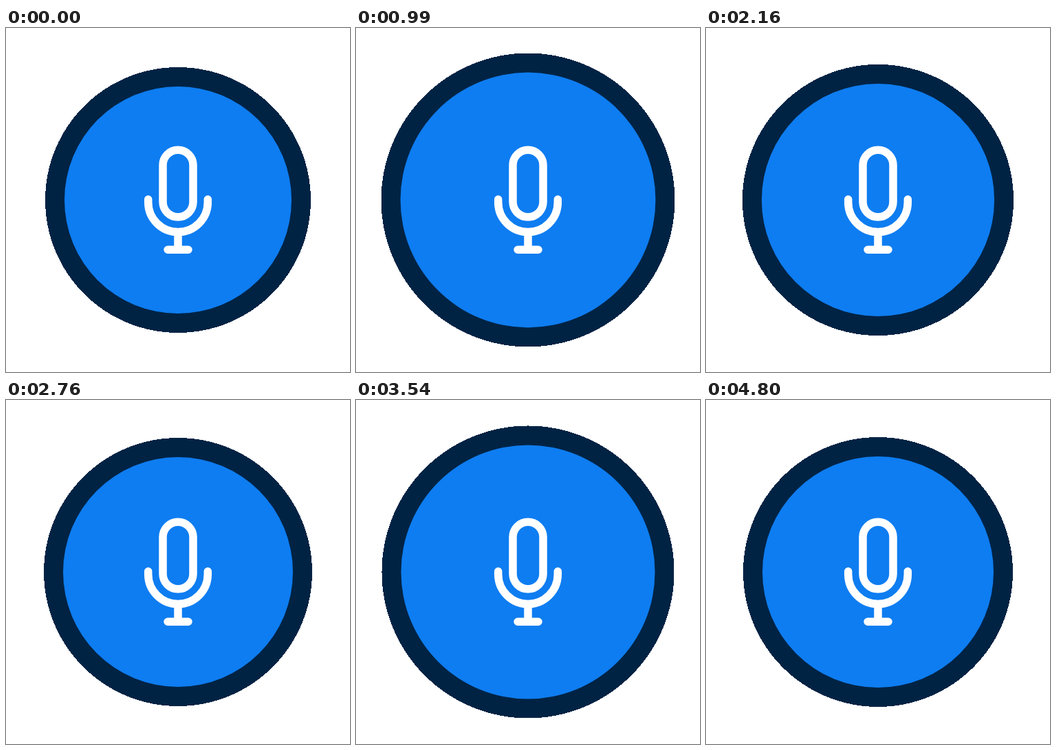
An HTML page that plays this animation: 500 px wide and 500 px high, repeating every 5.25 s.

```html
<!DOCTYPE html>
<html lang="en">
<head>
<meta charset="utf-8">
<title>Voice input</title>
<style>
  @property --level {
    syntax: "<length>";
    inherits: true;
    initial-value: 165px;
  }

  html, body {
    margin: 0;
    width: 100%;
    height: 100%;
    overflow: hidden;
    background: #fff;
  }

  svg {
    display: block;
    width: 100%;
    height: 100%;
    animation: pulse 5250ms ease-in-out infinite;
  }

  .ring {
    r: calc(var(--level) + 28px);
    fill: #002344;
    shape-rendering: crispEdges;
  }

  .disc {
    r: var(--level);
    fill: #0e7df1;
  }

  .mic {
    fill: none;
    stroke: #fff;
    stroke-width: 11.5;
    stroke-linecap: round;
  }

  /* One swell per syllable, then a rest before the loop restarts */
  @keyframes pulse {
    0%, 1.14% { --level: 165px; }
    6.29%  { --level: 195px; }
    11.43% { --level: 168px; }
    17.62% { --level: 189px; }
    22.1%  { --level: 167px; }
    26.48% { --level: 183px; }
    31.43% { --level: 168px; }
    36.95% { --level: 190px; }
    42.29% { --level: 167px; }
    47.24% { --level: 181px; }
    52.57% { --level: 167px; }
    57.71% { --level: 197px; }
    62.86% { --level: 167px; }
    68.57% { --level: 186px; }
    73.52% { --level: 167px; }
    78.67% { --level: 178px; }
    84.38% { --level: 167px; }
    88%    { --level: 188px; }
    91.43%, 100% { --level: 168px; }
  }
</style>
</head>
<body>
<svg viewBox="0 0 500 500">
  <circle class="ring" cx="250" cy="250"/>
  <circle class="disc" cx="250" cy="250"/>
  <g class="mic">
    <rect x="228" y="177.3" width="44" height="97.5" rx="22"/>
    <path d="M206.7 249v4.2a43.3 43.3 0 0 0 86.6 0V249M250 296.5V322M235 322.3h30"/>
  </g>
</svg>
</body>
</html>
```
